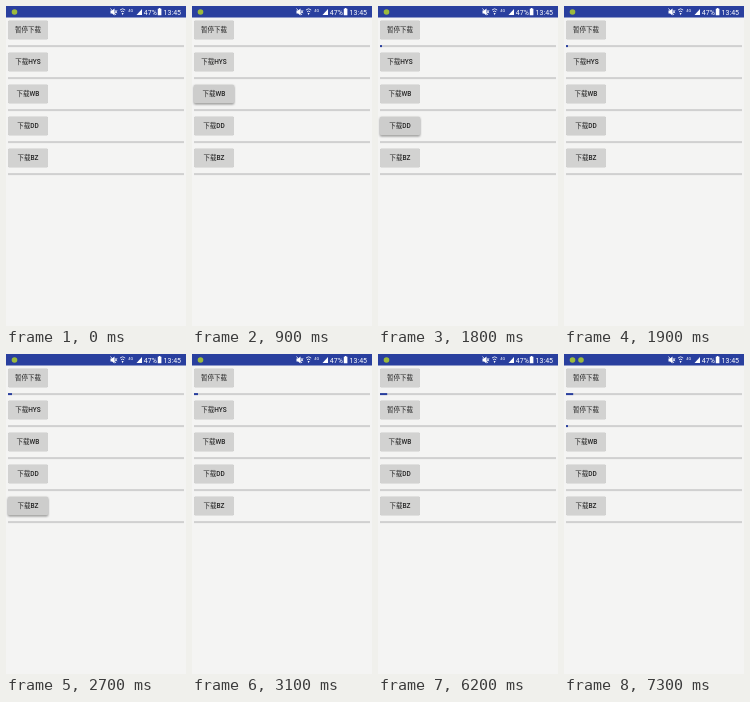
These frames come from a looping animation (180 by 320 pixels, 8000 ms). An HTML page:

```html
<!DOCTYPE html>
<html lang="zh">
<head>
<meta charset="utf-8">
<style>
html, body { margin: 0; width: 100%; height: 100%; overflow: hidden; background: #f4f4f3; }
svg { display: block; width: 180px; height: 320px; }
text { font-family: Roboto, "Noto Sans CJK SC", "Noto Sans CJK", sans-serif; }
.label { font-size: 6.5px; font-weight: 500; text-anchor: middle; fill: #222; }
.status { font-size: 7px; fill: #fff; }
.button { filter: drop-shadow(0 .4px .4px #0004); }
.pressed { filter: drop-shadow(0 1px 1.2px #0007); }
</style>
</head>
<body>
<svg viewBox="0 0 180 320">
  <rect width="180" height="320" fill="#f4f4f3"/>
  <rect width="180" height="11.5" fill="#293f9e"/>
  <g fill="#9cba3c">
    <circle cx="8.5" cy="6" r="2.8"/>
    <circle id="second" cx="17" cy="6" r="2.8"/>
  </g>
  <g fill="#fff">
    <path d="M104.5 4.5h1.6l2.4-2v7l-2.4-2h-1.6z"/>
    <path d="M104.5 2.5l5.5 6.5M109 4.2l2 3M111 4.2l-2 3" stroke="#fff" stroke-width=".8"/>
    <path d="M114 4q2.6-2.4 5.2 0M115 5.8q1.6-1.4 3.2 0" fill="none" stroke="#fff" stroke-width=".8"/>
    <path d="M115.6 7h2l-1 2.2z"/>
    <path d="M130.5 9h5.5V3z"/>
    <path d="M152.8 2h1.6v.8h1v6.4h-3.6V2.8h1z"/>
  </g>
  <text class="status" x="122.3" y="6" style="font-size:4px">4G</text>
  <text class="status" x="137.8" y="8.6">47%</text>
  <text class="status" x="157.6" y="8.6">13:45</text>
  <g id="rows"></g>
</svg>
<script>
const LOOP = 8000, PITCH = 32, PAUSE = '暂停下载';
const labels = [PAUSE, '下载HYS', '下载WB', '下载DD', '下载BZ'];
const pressAt = [Infinity, 100, 900, 1800, 2700];
// [time, width] steps of the two running downloads
const progress = [
  [[1200, 2], [2200, 4], [3300, 5.5], [4300, 7.2]],
  [[7300, 2]]
];

const rowsBox = document.getElementById('rows');
const second = document.getElementById('second');
rowsBox.innerHTML = labels.map((label, i) => `
  <g transform="translate(0 ${i * PITCH})">
    <rect class="button" x="2" y="14.8" width="40" height="18.4" rx="1.2"/>
    <text class="label" x="22" y="26.4">${label}</text>
    <rect x="2" y="39.1" width="176" height="2" fill="#d0d0d0"/>
    <rect class="fill" x="2" y="39.1" width="0" height="2" fill="#293f9e"/>
  </g>`).join('');

const rows = [...rowsBox.children].map(row => ({
  button: row.querySelector('.button'),
  text: row.querySelector('text'),
  fill: row.querySelector('.fill')
}));

function draw(t) {
  rows.forEach(({ button, text, fill }, i) => {
    const age = t - pressAt[i];
    const raised = age >= 0 && age < 100;
    const fading = age >= 100 && age < 400;
    button.setAttribute('class', raised ? 'button pressed' : 'button');
    button.setAttribute('fill', raised ? '#cdcdcc' : fading ? '#d0d0cf' : '#d2d2d1');
    const step = (progress[i] || []).filter(([at]) => t >= at).pop();
    fill.setAttribute('width', step ? step[1] : 0);
    text.textContent = i === 1 && t >= 6200 ? PAUSE : labels[i];
  });
  second.setAttribute('visibility', t >= 6800 ? 'visible' : 'hidden');
}

const start = performance.now();
function tick() {
  draw((performance.now() - start) % LOOP);
  requestAnimationFrame(tick);
}
tick();
</script>
</body>
</html>
```
